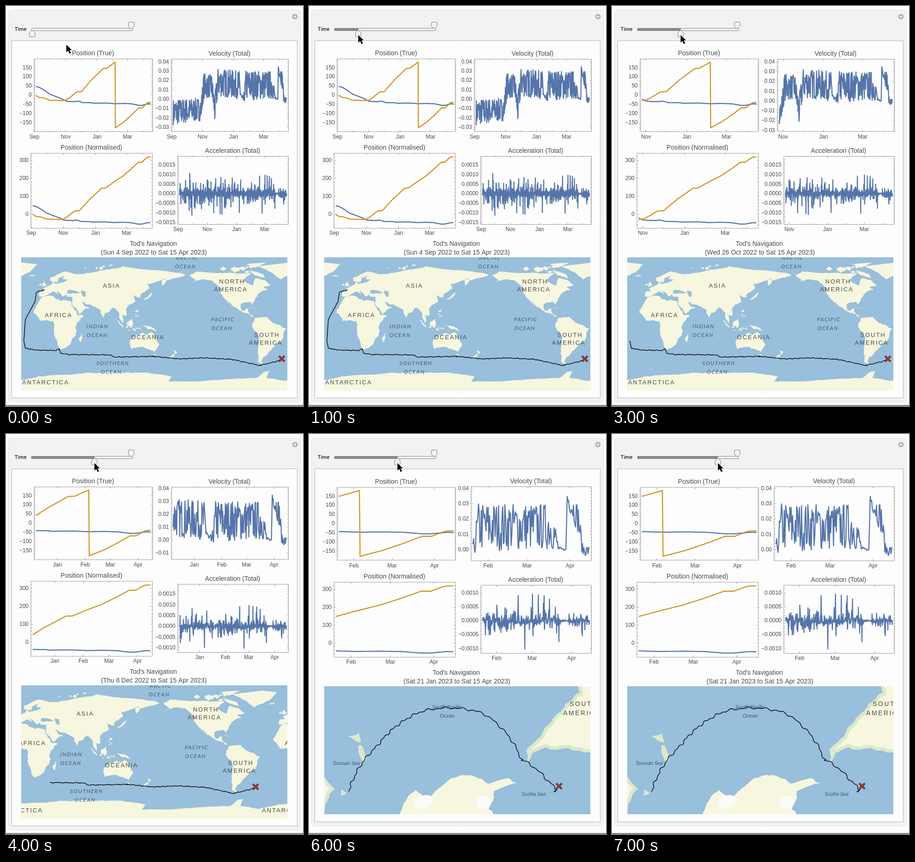
These frames come from a looping animation (645 px wide and 869 px high, 8000 ms). An HTML page with a canvas:

```html
<!DOCTYPE html>
<html lang="en">
<head>
<meta charset="utf-8">
<style>
html, body { margin: 0; height: 100%; overflow: hidden; background: #fdfdfd; }
canvas { display: block; }
</style>
</head>
<body>
<canvas id="stage" width="645" height="869"></canvas>
<script>
const ctx = document.getElementById('stage').getContext('2d');
const BLUE = '#5575aa', GOLD = '#cf921f', SEA = '#98bfdb', LAND = '#f7f6df', INK = '#4a4a4a';
const SANS = '"Liberation Sans", Arial, sans-serif', OCEAN_FONT = 'Lato, "Open Sans", sans-serif';
const LAST_DAY = 223;

// first days of the months, counted from 4 Sep 2022
const months = { Sep: -3, Oct: 27, Nov: 58, Dec: 88, Jan: 119, Feb: 150, Mar: 178, Apr: 209 };

const wide = { velBox: [359, 115.5, 272.5], accZero: 407.5, accGap: 20.8, pan: 0 };
const views = [
  { ...wide, start: 0, date: 'Sun 4 Sep 2022', labels: 'Sep Nov Jan Mar', velZero: 202.2, velGap: 20.35 },
  { ...wide, start: 52, date: 'Wed 26 Oct 2022', labels: 'Nov Jan Mar', velZero: 206, velGap: 21.3 },
  { ...wide, start: 95, date: 'Thu 8 Dec 2022', labels: 'Jan Feb Mar Apr', velZero: 230, velGap: 28, accZero: 417.5, accGap: 23.35, pan: -57 },
  { start: 139, date: 'Sat 21 Jan 2023', labels: 'Feb Mar Apr', velBox: [352, 114.5, 275.5], velZero: 251.2, velGap: 33.3, accZero: 405.5, accGap: 30.1, polar: true }
];

// one entry per second; the plots follow the slider late
const thumbs = [57, 107, 107, 149, 192, 192, 192, 230];
const shownViews = [0, 0, 1, 1, 2, 2, 3, 3];

const parse = s => s.split(' ').map(p => p.split(',').map(Number));
let seed = 7;
const random = () => (seed = (seed * 16807) % 2147483647) / 2147483647 * 2 - 1;

// day, longitude, latitude
const voyage = parse('0,-2,46 6,-13,43 14,-15,30 26,-28,6 52,-30,-23 58,-28,-33 66,-14,-35.5 78,14,-36 80,17.5,-33.5 86,18,-35 89,20,-40 92,31,-41.5 109,86,-42 112,93,-45 131,145,-44 138,146,-44 154,180,-47.5 171,213,-46 186,251,-48 200,290,-56.5 207,290,-56 214,311,-51 218,319,-48 223,320,-49');
// day, mean speed, spread (thousandths)
const speed = parse('0,-14,14 55,-11,12 60,14,14 76,14,12 82,-11,15 88,18,15 130,15,15 135,0,4 139,0,4 143,15,16 196,15,15 201,0,2 206,0,0 207,34,5 215,20,10 218,0,4 223,-1,3');

function lookup(keys, day, column) {
  let i = 1;
  while (i < keys.length - 1 && keys[i][0] < day) i++;
  const a = keys[i - 1], b = keys[i];
  return a[column] + (b[column] - a[column]) * (day - a[0]) / (b[0] - a[0]);
}

const sample = (step, f) => Array.from({ length: Math.round(LAST_DAY / step) + 1 }, (_, i) => [i * step, f(i * step)]);
const latitude = sample(0.5, d => lookup(voyage, d, 2) + 0.6 * Math.sin(d * 2.3) * Math.sin(d * 0.7));
const longitude = sample(0.5, d => lookup(voyage, d, 1));
const wrapped = longitude.map(([d, v]) => [d, v > 180 ? v - 360 : v]);
const velocity = sample(0.5, d => {
  const r = random();
  return (lookup(speed, d, 1) + lookup(speed, d, 2) * Math.sign(r) * Math.abs(r) ** 0.8) / 1000;
});
const acceleration = sample(0.2, d => {
  const r = random(), calm = Math.min(1, lookup(speed, d, 2) / 10);
  return calm * (r ** 3 * 0.0004 + r ** 25 * 0.0007 + random() * 0.0001);
});

function text(s, x, y, font, color, align = 'center', spacing = 0) {
  ctx.font = font;
  ctx.fillStyle = color;
  ctx.textAlign = align;
  ctx.textBaseline = 'middle';
  ctx.letterSpacing = spacing + 'px';
  ctx.fillText(s, x + (align === 'center' ? spacing / 2 : 0), y + 0.5);
}

function trace(points, closed) {
  ctx.beginPath();
  points.forEach(([x, y]) => ctx.lineTo(x, y));
  if (closed) ctx.closePath();
}

function fill(points, color) {
  trace(points, true);
  ctx.fillStyle = color;
  ctx.fill();
}

function stroke(points, color, width, closed) {
  trace(points, closed);
  ctx.strokeStyle = color;
  ctx.lineWidth = width;
  ctx.lineJoin = 'round';
  ctx.stroke();
}

function plot(view, { title, at, box, zero, gap, step, digits, labelY, series }) {
  const [l, t, r, b] = box, x0 = l + 4, x1 = r - 4.5;
  const px = d => x0 + (d - view.start) / (LAST_DAY - view.start) * (x1 - x0);
  const py = v => zero - v / step * gap;
  text(title, ...at, '14px ' + SANS, INK);
  for (const [data, color] of series)
    stroke(data.filter(p => p[0] >= view.start).map(([d, v]) => [px(d), py(v)]), color, 2.3);

  const tick = (x, y, dx, dy) => stroke([[x, y], [x + dx, y + dy]], '#808080', 0.8);
  for (let k = -100; k <= 100; k++) {
    const y = zero - k * gap / 5, major = k % 5 === 0;
    if (y < t + 2 || y > b - 2) continue;
    tick(l, y, major ? 4 : 2.5, 0);
    tick(r, y, major ? -4 : -2.5, 0);
    if (major) text((k / 5 * step).toFixed(digits).replace('-', '−'), l - 5, y, '12px ' + SANS, INK, 'right');
  }
  for (const [name, day] of Object.entries(months)) {
    const x = px(day);
    if (x < l - 1 || x > r) continue;
    const labelled = view.labels.includes(name);
    tick(x, b, 0, labelled ? -4 : -2.5);
    tick(x, t, 0, labelled ? 4 : 2.5);
    if (labelled) text(name, x, labelY, '12px ' + SANS, INK);
  }
  ctx.strokeRect(l, t, r - l, b - t);
}

// rough outlines as longitude, latitude
const outlines = {
  europe: '-9,37 -9,43 -2,44 -4,48 8,54 10,57 13,54 22,56 29,60 22,61 25,65 17,62 15,56 6,58 5,62 25,71 41,67 60,69 62,40 48,40 38,45 29,45 28,41 23,37 14,45 17,39 10,44 -2,37',
  asia: '55,68 73,72 104,77 180,69 189,66 163,59 157,51 156,59 163,61 137,54 140,48 128,40 128,35 118,39 121,30 108,20 109,11 101,13 104,1 98,16 91,22 80,15 77,8 72,20 57,26 48,30 36,36 28,37 27,41 41,41 55,42',
  arabia: '35,28 36,37 48,31 51,25 59,22 45,13',
  africa: '-6,36 10,37 20,31 33,31 43,12 51,11 40,-4 40,-16 33,-27 20,-35 12,-17 9,4 -8,4 -17,15 -10,30',
  madagascar: '49,-12 47,-25 44,-20',
  britain: '-5,50 1,52 -3,58 -5,54',
  ireland: '-10,52 -6,52 -7,55',
  iceland: '-24,64 -14,65 -20,66',
  japan: '130,32 140,36 144,43 137,36',
  sumatra: '95,6 106,-6 101,-2',
  borneo: '109,1 117,7 117,-3 110,-3',
  newGuinea: '131,-1 141,-3 150,-10 138,-7',
  australia: '114,-22 130,-12 136,-15 142,-11 153,-27 147,-38 138,-34 131,-31 115,-34',
  tasmania: '145,-41 148,-41 147,-43.5',
  northIsland: '173,-35 178,-38 175,-41',
  southIsland: '173,-41 174,-42 169,-47 167,-46',
  northAmerica: '-166,66 -156,71 -95,68 -82,69 -94,59 -80,52 -77,62 -64,59 -56,52 -66,50 -60,46 -70,43 -76,36 -81,26 -84,30 -97,27 -95,18 -87,21 -83,10 -78,8 -95,16 -106,23 -114,31 -110,23 -124,41 -124,48 -135,58 -150,60 -165,55 -157,59',
  baffin: '-85,73 -66,67 -64,62 -78,66',
  ellesmere: '-90,81 -62,83 -77,76',
  greenland: '-73,78 -32,83 -12,81 -22,70 -43,60 -54,69',
  cuba: '-85,22 -75,20 -79,22',
  southAmerica: '-77,8 -62,10 -50,0 -35,-6 -40,-20 -58,-37 -66,-45 -69,-51 -66,-55 -73,-52 -71,-18 -81,-5',
  antarctica: '-40,-78 -10,-71 55,-66 130,-66 170,-71 165,-78 200,-78 225,-76 260,-74 285,-73 295,-65 303,-63 298,-73 330,-78 330,-90 -40,-90'
};

// splits an edge into a ragged coastline
function ragged(a, b) {
  const dx = b[0] - a[0], dy = b[1] - a[1], length = Math.hypot(dx, dy);
  if (length < 2) return [a];
  const y = (a[1] + b[1]) / 2;
  const bend = random() * Math.min(0.15, 2 / length) * Math.cos(y * Math.PI / 180);
  const middle = [(a[0] + b[0]) / 2 + bend * dy, y - bend * dx];
  return [...ragged(a, middle), ...ragged(middle, b)];
}
const coast = corners => corners.flatMap((p, i) => ragged(p, corners[(i + 1) % corners.length]));

function islands(count, lon, lat, spreadX, spreadY, size) {
  return Array.from({ length: count }, () => {
    const x = lon + random() * spreadX, y = lat + random() * spreadY;
    const w = size * (1.3 + random() * 0.6), h = size * (0.7 + random() * 0.3);
    return coast([[x - w, y], [x, y + h], [x + w, y], [x, y - h]]);
  });
}

const lands = [
  ...Object.values(outlines).map(s => coast(parse(s))),
  ...islands(14, -102, 74, 20, 4.5, 3),
  ...islands(7, 75, 77, 30, 3, 1.8),
  ...islands(12, 117, -6, 11, 3, 1.2),
  ...islands(7, 123, 12, 2.5, 6, 1.3)
];
const caspian = coast(parse('47,45 53,44 54,37 50,37'));

const continents = [['ASIA', 228, 608], ['AFRICA', 113, 672], ['OCEANIA', 307, 720], ['NORTH', 490, 599], ['AMERICA', 487, 616], ['SOUTH', 566, 715], ['AMERICA', 563, 732], ['ANTARCTICA', 85, 818]];
const oceans = [['INDIAN', 198, 696], ['OCEAN', 197, 715], ['PACIFIC', 470, 681], ['OCEAN', 468, 700], ['SOUTHERN', 231, 776], ['OCEAN', 228, 795], ['ARCTIC', 392, 547], ['OCEAN', 389, 566]];
const seas = [['South Pacific', 300, 593], ['Ocean', 300, 612], ['Tasman Sea', 81, 715], ['Scotia Sea', 488, 782]];

const flat = ([lon, lat]) => [87 + 1.606 * lon, 690.5 - 1.606 * lat];

// Lambert azimuthal equal-area, centred at 125° W, 67° S
function azimuthal([lon, lat]) {
  const rad = Math.PI / 180, turn = (lon - 235) * rad, center = -67 * rad;
  const sin = Math.sin(lat * rad), cos = Math.cos(lat * rad);
  const s0 = Math.sin(center), c0 = Math.cos(center);
  const k = 300 * Math.sqrt(2 / (1 + s0 * sin + c0 * cos * Math.cos(turn)));
  return [322 + k * cos * Math.sin(turn), 699 - k * (c0 * sin - s0 * cos * Math.cos(turn))];
}

function track(view, project) {
  const route = longitude.map(([d, lon], i) => [lon, latitude[i][1], d]).filter(p => p[2] >= view.start);
  stroke(route.map(project), '#000', 1.4);
}

function cross(x, y) {
  for (const [color, width] of [['#3a2a2a', 4], ['#b8302c', 2.4]])
    for (const s of [1, -1]) stroke([[x - 6, y - 6 * s], [x + 6, y + 6 * s]], color, width);
}

function shifted(x, paint) {
  ctx.save();
  ctx.translate(x, 0);
  paint();
  ctx.restore();
}

function worldMap(view) {
  const copies = [-578, 0, 578].map(turn => turn + view.pan);
  for (const x of copies) shifted(x, () => {
    for (const land of lands) fill(land.map(flat), LAND);
    fill(caspian.map(flat), SEA);
  });
  for (const x of copies) shifted(x, () => {
    for (const [s, cx, cy] of continents) text(s, cx, cy, '13px ' + SANS, INK, 'center', 2);
    for (const [s, cx, cy] of oceans) text(s, cx, cy, 'italic 11.5px ' + OCEAN_FONT, '#3f5a76', 'center', 1.7);
  });
  shifted(view.pan, () => {
    track(view, flat);
    cross(599, 766.5);
  });
}

function polarMap(view) {
  const southern = lands.filter(land => land.every(p => p[1] < 13));
  for (const land of southern) {
    const points = land.map(azimuthal), icy = land.some(p => p[1] < -80);
    fill(points, LAND);
    if (icy) continue;
    ctx.save();
    ctx.clip();
    stroke(points, '#dde8ca', 14, true);
    ctx.restore();
  }
  for (const [x, y, rx, ry] of [[249, 799, 21, 13], [379, 800, 16, 14]]) {
    ctx.beginPath();
    ctx.ellipse(x, y, rx, ry, -0.4, 0, 7);
    ctx.fillStyle = '#fbfcfb';
    ctx.fill();
  }
  for (const [s, x, y] of seas) text(s, x, y, 'italic 12px ' + OCEAN_FONT, '#3f5a76');
  text('SOUTH', 566, 587, '14px ' + SANS, INK, 'left', 2.5);
  text('AMERICA', 552, 606.5, '14px ' + SANS, INK, 'left', 2.5);
  track(view, azimuthal);
  cross(543, 765);
}

function slider(x) {
  const bar = (l, r, color, edge) => {
    ctx.beginPath();
    ctx.roundRect(l, 48.5, r - l, 5, 2.5);
    ctx.fillStyle = color;
    ctx.fill();
    ctx.strokeStyle = edge;
    ctx.lineWidth = 1;
    ctx.stroke();
  };
  const thumb = (cx, y, s) => {
    const points = [[0, 0], [6, 6], [6, 14], [5, 15], [-5, 15], [-6, 14], [-6, 6]].map(([a, b]) => [cx + a, y + b * s]);
    fill(points, '#f4f4f4');
    stroke(points, '#777', 1, true);
  };
  bar(55, 275.5, '#fff', '#777');
  if (x > 60) bar(55, x, '#8d8d8d', '#707070');
  thumb(272, 50, -1);
  thumb(x, 52, 1);
}

function pointer(x, y) {
  const points = parse('0,0 0,16.5 4,13 7,19.5 10,18 7,11.8 12,11.8').map(([a, b]) => [x + a, y + b]);
  stroke(points, '#fff', 2.2, true);
  fill(points, '#000');
}

function panel(bottom) {
  ctx.fillStyle = '#fdfdfd';
  ctx.fillRect(0, 0, 645, 869);
  ctx.beginPath();
  ctx.roundRect(5.5, 8.5, 634, bottom - 8, 6);
  ctx.fillStyle = '#f2f2f2';
  ctx.fill();
  ctx.strokeStyle = '#e4e4e4';
  ctx.lineWidth = 1;
  ctx.stroke();
  ctx.fillStyle = '#fdfdfd';
  ctx.fillRect(12.5, 75.5, 620, bottom - 84);
  ctx.strokeStyle = '#b4b4b4';
  ctx.strokeRect(12.5, 75.5, 620, bottom - 84);
  ctx.fillStyle = '#555';
  ctx.fillRect(0, 867, 645, 1.5);
  ctx.beginPath();
  ctx.arc(627.5, 23, 5.8, 0, 7);
  ctx.fillStyle = '#aaa';
  ctx.fill();
  stroke([[624, 23], [631, 23]], '#fff', 1.6);
  stroke([[627.5, 19.5], [627.5, 26.5]], '#fff', 1.6);
  text('Time', 18.5, 50, '500 11px Inter, sans-serif', '#111', 'left');
}

function draw(step) {
  const view = views[shownViews[step]], drop = view.polar ? 2 : 0, half = drop / 2;
  const [velLeft, velTop, velBottom] = view.velBox;
  panel(view.polar ? 851 : 860);
  slider(thumbs[step]);
  plot(view, { title: 'Position (True)', at: [189, 103 + half / 2], box: [61, 115 + half, 318.5, 273 + half], zero: 193.4 + half, gap: 19.9, step: 50, digits: 0, labelY: 284 + drop, series: [[latitude, BLUE], [wrapped, GOLD]] });
  plot(view, { title: 'Position (Normalised)', at: [185.5, 307.5 + drop], box: [54, 320 + drop, 318, 483 + drop], zero: 452 + drop, gap: 38.8, step: 100, digits: 0, labelY: 493 + drop, series: [[latitude, BLUE], [longitude, GOLD]] });
  plot(view, { title: 'Velocity (Total)', at: [view.polar ? 482 : 485.5, 104 - half], box: [velLeft, velTop, 613.5, velBottom], zero: view.velZero, gap: view.velGap, step: 0.01, digits: 2, labelY: 284 + drop, series: [[velocity, BLUE]] });
  plot(view, { title: 'Acceleration (Total)', at: [492, 314.5 + drop], box: [373, 326.5 + drop, 613.5, 474.5 + drop], zero: view.accZero, gap: view.accGap, step: 0.0005, digits: 4, labelY: 485.5 + drop, series: [[acceleration, BLUE]] });
  text("Tod's Navigation", 320, 516.5 + drop, '14px ' + SANS, INK);
  text(`(${view.date} to Sat 15 Apr 2023)`, 321, 536 + drop, '14px ' + SANS, INK);

  ctx.save();
  ctx.beginPath();
  ctx.rect(33, 546 + drop, 578, view.polar ? 278 : 289);
  ctx.clip();
  ctx.fillStyle = SEA;
  ctx.fillRect(33, 546, 578, 290);
  (view.polar ? polarMap : worldMap)(view);
  ctx.restore();
  if (step === 0) pointer(131, 84);
  else pointer(thumbs[step], 63);
}

let shown = -1;
function tick(now) {
  const step = Math.floor(now / 1000) % thumbs.length;
  if (step !== shown) draw(shown = step);
  requestAnimationFrame(tick);
}
tick(performance.now());
</script>
</body>
</html>
```
